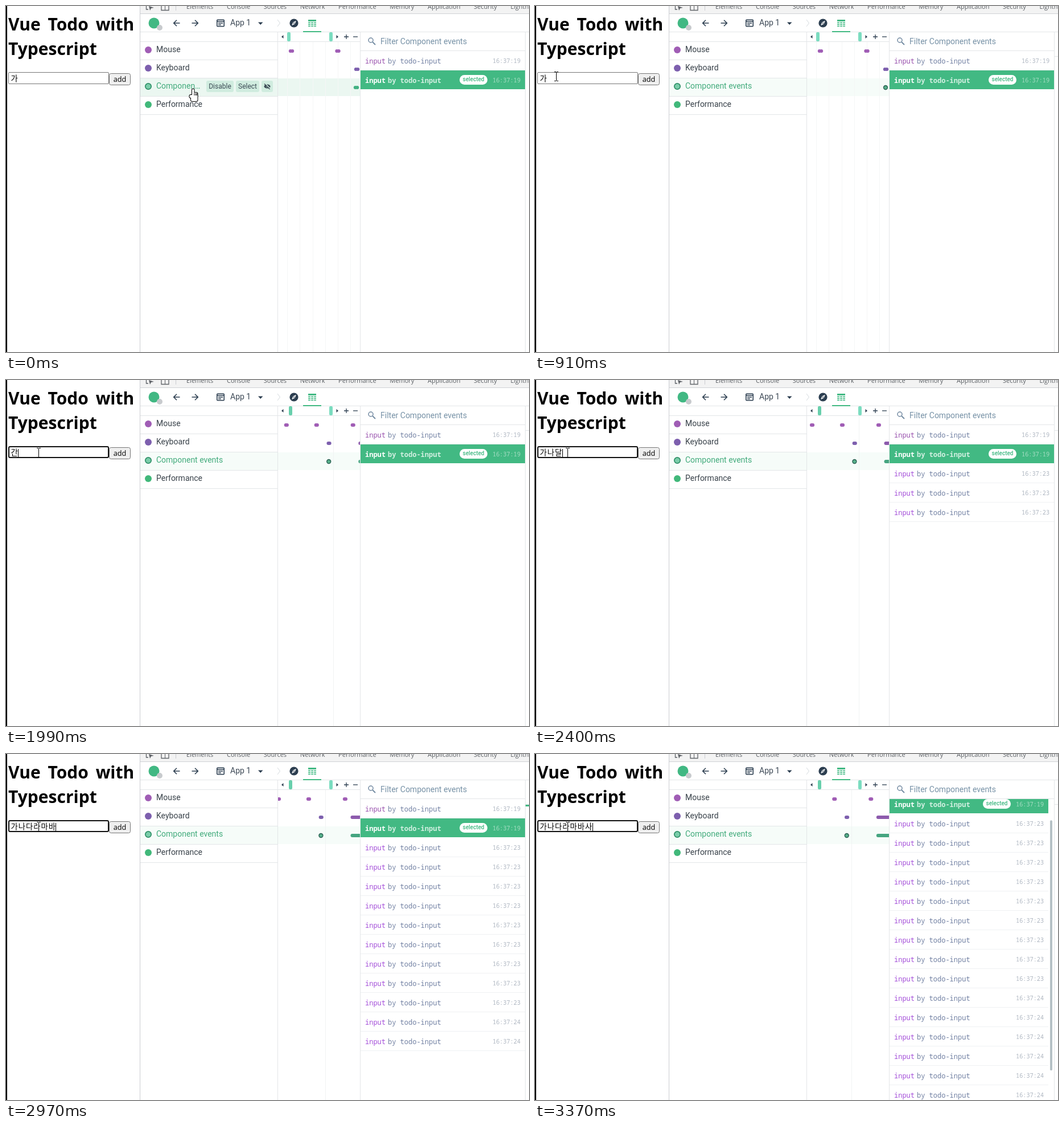
An HTML page with a canvas for the animation above (3.44 s loop, 919 by 607 pixels).

```html
<!DOCTYPE html>
<html lang="ko">
<head>
<meta charset="utf-8">
<title>Todo timeline</title>
<style>
html, body { margin: 0; width: 100%; height: 100%; overflow: hidden; background: #fff; }
canvas { display: block; }
</style>
</head>
<body>
<canvas id="stage" width="919" height="607"></canvas>
<script>
const ctx = document.getElementById('stage').getContext('2d');
const LOOP = 3440, HOVER_END = 200, FOCUS = 1100, TYPING = 1990;
const UI = 'Roboto, sans-serif', PAGE = '"Open Sans", sans-serif';
const MONO = '"Noto Sans Mono", monospace', KOREAN = '"Noto Sans CJK KR", "Noto Sans CJK", sans-serif';
const GREEN = '#42b983', DARK = '#2c3e50', LINE = '#e3e6e8', HANDLE = '#7bdcc0';
const MOUSE = '#a05db5', KEY = '#7d5fae';

const clamp = (v, lo, hi) => Math.max(lo, Math.min(hi, v));

// Time, x and y of the pointer tip.
const path = [[0, 323, 145], [200, 205, 162], [410, 66, 140], [550, 13, 119], [780, 13, 118], [1020, 57, 127]];
function pointerAt(t) {
  const i = path.findIndex(p => p[0] > t);
  if (i < 0) return path[path.length - 1].slice(1);
  const a = path[i - 1], b = path[i], p = (t - a[0]) / (b[0] - a[0]);
  return [a[1] + (b[1] - a[1]) * p, a[2] + (b[2] - a[2]) * p];
}

// Each new consonant first closes the last syllable, then its vowel opens the next one.
const syllables = '가나다라마바사', codas = [4, 7, 8, 16, 17, 19];
function typedAt(t) {
  const keys = t < TYPING ? 0 : Math.min(12, Math.floor(1.4 + (t - TYPING) / 112));
  const full = keys >> 1, last = syllables.charCodeAt(full);
  return syllables.slice(0, full) + String.fromCharCode(last + (keys % 2 ? codas[full] : 0));
}

const rowsAt = t => clamp(Math.floor(5 + (t - 2400) / 69), 2, 17);

function rect(x, y, w, h, color) {
  ctx.fillStyle = color;
  ctx.fillRect(x, y, w, h);
}
function paint(fill, stroke, lw) {
  if (fill) { ctx.fillStyle = fill; ctx.fill(); }
  if (stroke) { ctx.strokeStyle = stroke; ctx.lineWidth = lw; ctx.stroke(); }
}
function box(x, y, w, h, r, fill, stroke, lw = 1) {
  ctx.beginPath();
  ctx.roundRect(x, y, w, h, r);
  paint(fill, stroke, lw);
}
function dot(x, y, r, fill, stroke, lw = 1.5) {
  ctx.beginPath();
  ctx.arc(x, y, r, 0, 7);
  paint(fill, stroke, lw);
}
function text(s, x, y, font, color, align = 'left') {
  ctx.font = font;
  ctx.fillStyle = color;
  ctx.textAlign = align;
  ctx.fillText(s, x, y);
}
function trace(x, y, pts) {
  for (let i = 0; i < pts.length; i += 2) ctx[i ? 'lineTo' : 'moveTo'](x + pts[i], y + pts[i + 1]);
}
function lines(x, y, color, lw, ...paths) {
  ctx.beginPath();
  for (const p of paths) trace(x, y, p);
  paint(null, color, lw);
}
function shape(x, y, pts, fill, stroke) {
  ctx.beginPath();
  trace(x, y, pts);
  ctx.closePath();
  paint(fill, stroke, 1);
}
function clipped(x, y, w, h, draw) {
  ctx.save();
  ctx.beginPath();
  ctx.rect(x, y, w, h);
  ctx.clip();
  draw();
  ctx.restore();
}

function page(t) {
  rect(0, 0, 2, 607, '#000');
  ctx.wordSpacing = '5px';
  text('Vue Todo with', 4, 43, `bold 30px ${PAGE}`, '#000');
  ctx.wordSpacing = '0px';
  text('Typescript', 4, 86, `bold 30px ${PAGE}`, '#000');

  if (t >= FOCUS) box(5, 117, 175, 19, 2, '#fff', '#101010', 2);
  else box(4.5, 116.5, 176, 20, 1.5, '#fff', '#767676');
  const value = typedAt(t);
  ctx.letterSpacing = '1px';
  text(value, 8.5, 132, `300 13.3px ${KOREAN}`, '#000');
  const end = 8 + ctx.measureText(value).width;
  ctx.letterSpacing = '0px';
  if (t >= FOCUS && (t < 1590 || t >= TYPING)) rect(Math.round(end), 121, 1, 14, '#000');

  box(181.5, 118.5, 37, 20, 3, '#efefef', '#767676');
  text('add', 200, 133, `12.7px ${PAGE}`, '#000', 'center');
}

function tabs() {
  rect(235, 0, 1, 607, '#cacdd1');
  rect(236, 0, 683, 13, '#f3f3f3');
  rect(236, 13, 683, 1, '#cfd2d5');
  let x = 317;
  for (const name of 'Elements Console Sources Network Performance Memory Application Security Lighthouse'.split(' ')) {
    text(name, x, 5, `11px ${PAGE}`, '#5a5f64');
    x += ctx.measureText(name).width + 23.6;
  }
  lines(246, 0, '#5f6368', 1.3, [0.5, 0, 0.5, 6, 4, 6]);
  shape(251, 0, [0, 0, 9, 3, 4, 4, 2, 8], '#5f6368');
  box(273, -5, 13, 12.5, 0, null, '#5f6368', 1.3);
  rect(279, 0, 1, 7, '#5f6368');
  rect(298, 0, 1, 8, '#cacdd1');
}

function arrow(x, dir) {
  lines(x, 30, DARK, 1.6, [-5.5 * dir, 0, 5.5 * dir, 0], [0, -5.3, 5.3 * dir, 0, 0, 5.3]);
}

function toolbar() {
  rect(236, 45, 683, 1, LINE);
  dot(260, 30, 9.5, '#41b883');
  dot(270, 38, 5, '#c8cbce');
  arrow(300, -1);
  arrow(332, 1);
  box(370.8, 24.3, 12.4, 11.4, 1, null, DARK, 1.6);
  [12, 8, 5].forEach((w, i) => rect(w > 8 ? 371 : 373, 26.3 + 3 * i, w, 1.5, DARK));
  text('App 1', 394, 34, `14px ${UI}`, '#3b4754');
  shape(443, 28.5, [0, 0, 8.5, 0, 4.2, 4.5], DARK);
  lines(477, 30, '#d5dade', 1, [0, -6, 4.5, 0, 0, 6]);
  dot(506, 30, 7.6, DARK);
  shape(506, 30, [4, -4.2, 1.5, 1.5, -4, 4.2, -1.5, -1.5], '#fff');
  dot(506, 30, 1, DARK);
  rect(531, 24, 14, 3, GREEN);
  for (const y of [28.5, 31.5, 34.5])
    for (const x of [531, 536, 541]) rect(x, y, 4, 1.6, GREEN);
  rect(522, 44, 32, 2, GREEN);
}

function pill(x, w, label) {
  box(x, 131, w, 20, 3, '#d0ecdf');
  text(label, x + w / 2, 145, `12px ${UI}`, '#3b4b55', 'center');
}

function hiddenEye(x, y) {
  ctx.beginPath();
  ctx.ellipse(x, y, 5.5, 3.6, 0, 0, 7);
  paint('#3b4b55');
  dot(x, y, 1.8, '#d0ecdf');
  lines(x, y, '#d0ecdf', 1.2, [-3.5, -5, 5.5, 4]);
  lines(x, y, '#3b4b55', 1.2, [-5, -4.5, 4.5, 5]);
}

function layers(hover) {
  rect(236, 127, 386, 31, hover ? '#ebf7f1' : '#f6fcf9');
  rect(236, 62, 386, 1, LINE);
  ['Mouse', 'Keyboard', 'Component events', 'Performance'].forEach((name, i) => {
    const y = 77 + 32 * i, on = i === 2;
    rect(236, y + 17, 241, 1, LINE);
    if (on) dot(250, y, 5.2, '#79cda9', '#2f9068', 1.7);
    else dot(250, y, 6, [MOUSE, KEY, '', '#41b87a'][i]);
    text(on && hover ? 'Componen…' : name, 264, y + 4, `14px ${UI}`, on ? '#42ab7c' : '#39424a');
  });
  if (hover) {
    pill(352, 48, 'Disable');
    pill(404, 41, 'Select');
    pill(449, 20, '');
    hiddenEye(459, 141);
  }
  rect(477, 46, 1, 561, LINE);
  rect(622, 46, 1, 561, LINE);
}

function timeline(t, hover) {
  // While typing, the window follows the present, so older events drift left.
  const live = t >= TYPING, zoomed = t >= FOCUS;
  const first = 622.3 - (t - TYPING) * 0.0141;
  const scale = live ? 0.65 : zoomed ? 0.695 : 1;
  const left = live ? first - 129.5 : zoomed ? 494 : 501.5;
  const at = u => left + (u - 501.5) * scale;
  const pair = (u, y, color) => [-1.7, 1.7].forEach(d => dot(at(u + d), y, 3, color));

  clipped(478, 63, 144, 544, () => {
    if (zoomed) rect(Math.round(at(628)), 63, 1, 544, '#f1f3f3');
    else for (let x = 494; x < 622; x += 22.3) rect(Math.round(x), 63, 1, 544, '#f5f6f6');
    for (const u of [501.5, 583, 681.4]) pair(u, 79, MOUSE);
    pair(616.5, 111, KEY);
    if (hover) pair(615.5, 143, '#43b183');
    else dot(at(616), 143, 3.4, '#57b38c', '#33695a', 1.6);
    if (live) {
      box(first - 3, 108, 40, 6, 3, '#8d5bad');
      box(first - 3, 140, 40, 6, 3, '#45a580');
    }
  });

  box(live ? 497 : 494, 46, 6, 16, 2, live ? '#68cfac' : HANDLE);
  box(568, 46, 6, 16, 2, HANDLE);
  shape(484, 54, [0, 0, 3.5, -3, 3.5, 3], DARK);
  shape(584, 54, [0, 0, -3.5, -3, -3.5, 3], DARK);
  lines(598, 54, DARK, 1.3, [-4, 0, 4, 0], [0, -4, 0, 4]);
  lines(614, 54, DARK, 1.3, [-4, 0, 4, 0]);
}

function eventRow(i, y, right) {
  const on = i === 1, weight = on ? 'bold ' : '';
  const time = '16:37:' + (i < 2 ? 19 : i < 11 ? 23 : 24);
  if (on) rect(623, y, right - 623, 33, GREEN);
  else rect(623, y + 33, right - 623, 1, '#eff1f3');
  text('input', 631, y + 22, `${weight}12px ${MONO}`, on ? '#fff' : i ? '#a44fd9' : '#9850ad');
  text('by todo-input', 671, y + 22, `${weight}12px ${MONO}`, on ? '#d3f0e2' : '#7281a3');
  text(time, right - 8, y + 21, `10.2px ${MONO}`, on ? '#a9dec5' : '#adb5c0', 'right');
  if (on) {
    box(right - 115, y + 8, 49, 17, 8.5, '#fff');
    text('selected', right - 90.5, y + 19, `500 10px ${UI}`, GREEN, 'center');
  }
}

function events(t) {
  dot(641, 60, 4, null, '#7189a0');
  lines(641, 60, '#7189a0', 1.8, [3, 3, 8, 8]);
  text('Filter Component events', 658, 67, `14px ${UI}`, '#7691a6');
  rect(623, 78, 289, 1, LINE);

  const count = rowsAt(t), scroll = Math.max(0, count * 34 - 536);
  clipped(623, 79, 289, 528, () => {
    for (let i = 0; i < count; i++) eventRow(i, 79 + 34 * i - scroll, scroll ? 902 : 912);
    if (scroll) box(905, 84 + scroll * 0.77, 4, 502 - scroll * 1.5, 2, '#b5c1c5');
  });
  rect(912, 46, 1, 561, LINE);
  if (t >= 60) rect(913, 88, 6, 1, LINE);
  if (t >= 2470 && t < 3240) rect(913, 89, 6, 3, GREEN);
}

function hand(x, y) {
  const parts = [[5, 0.5, 3.5, 14], [8, 7, 6.5, 8], [0.5, 11, 5, 5], [3, 11, 11.5, 11]];
  for (const [dx, dy, w, h] of parts) box(x + dx, y + dy, w, h, 2, null, '#000', 2);
  for (const [dx, dy, w, h] of parts) box(x + dx, y + dy, w, h, 2, '#fff');
  for (const dx of [8.5, 11, 13]) rect(x + dx, y + 8, 1, 4, '#000');
}

function cursor(t, hover) {
  const [x, y] = pointerAt(t).map(Math.round);
  if (hover) hand(x, y);
  else if (t < 480) shape(x + 0.5, y + 0.5, [0, 0, 0, 16, 4, 12.5, 6.5, 18.5, 9, 17.5, 6.5, 11.5, 11, 11.5], '#fff', '#000');
  else {
    rect(x, y - 7, 1, 15, '#000');
    for (const dy of [-8, 8]) {
      rect(x - 3, y + dy, 3, 1, '#000');
      rect(x + 1, y + dy, 3, 1, '#000');
    }
  }
}

function draw(t) {
  const hover = t < HOVER_END;
  rect(0, 0, 919, 607, '#fff');
  page(t);
  tabs();
  toolbar();
  layers(hover);
  timeline(t, hover);
  events(t);
  cursor(t, hover);
}

const start = performance.now();
function frame() {
  draw((performance.now() - start) % LOOP);
  requestAnimationFrame(frame);
}
frame();
</script>
</body>
</html>
```
